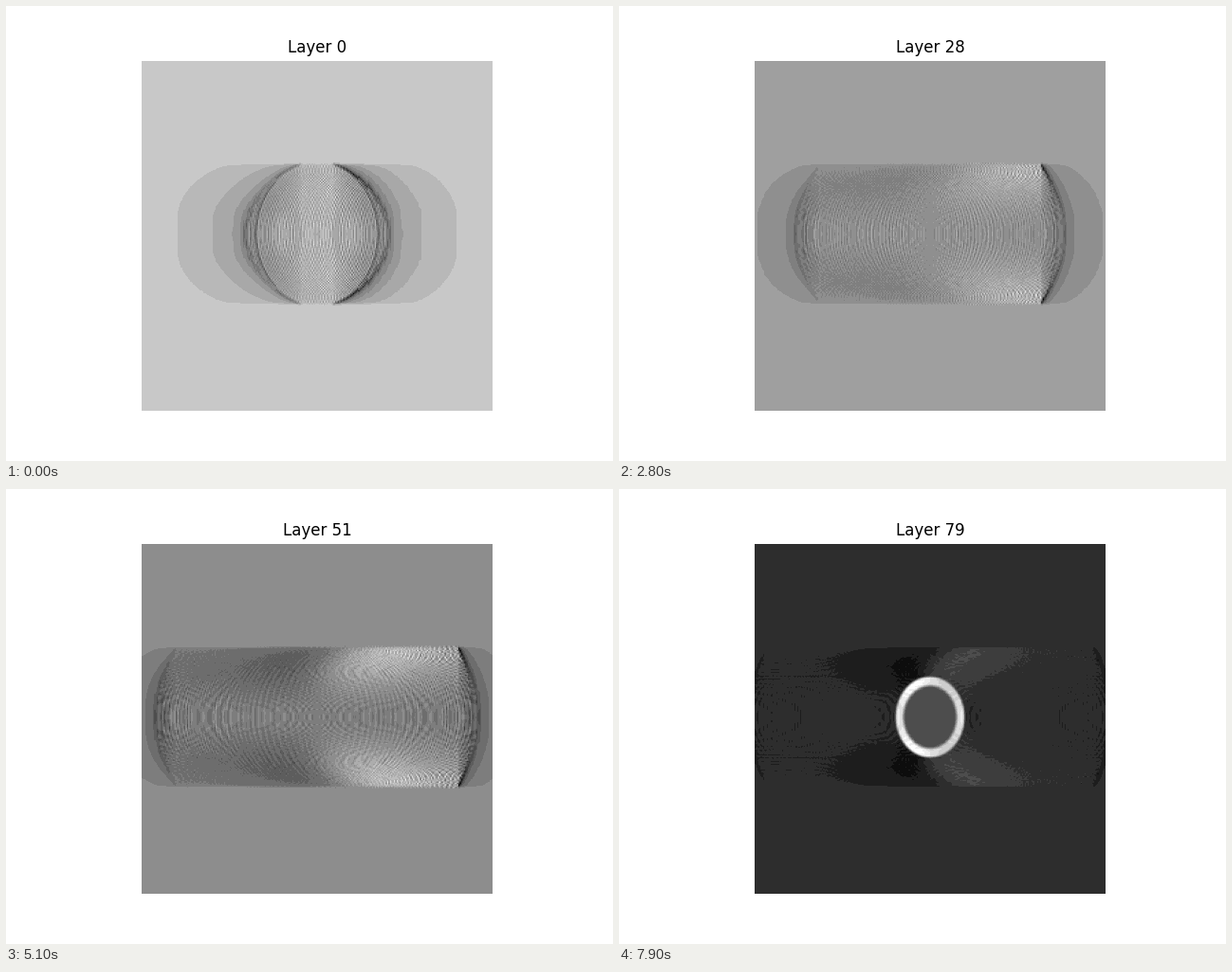
A matplotlib script for the animation above (8 s loop, 640 px wide and 480 px high).

```python
import numpy as np
import matplotlib.pyplot as plt
from matplotlib.animation import FuncAnimation
from matplotlib.colors import ListedColormap

SIZE, LAYERS, ROWS, TOP = 256, 80, 104, 75
VIEWS, HALF, RADIUS = 180, 128, 64
SKEW = 1.4   # how unevenly the views weigh towards the caps
STEP = 16    # grey levels per visible band

# Head phantom: density, semi-axes, x and y of the centre, tilt in degrees
ELLIPSOIDS = [
    (1.0, .69, .92, .81, 0, 0, 0),
    (-.8, .6624, .874, .78, 0, -.0184, 0),
    (-.2, .11, .31, .22, .22, 0, -18),
    (-.2, .16, .41, .28, -.22, 0, 18),
]


def project(theta, s, z):
    """Parallel line integrals through the phantom, shape (s, z)."""
    total = np.zeros((s.size, z.size))
    for rho, a, b, c, cx, cy, tilt in ELLIPSOIDS:
        phi = theta - np.radians(tilt)
        r2 = (a * np.cos(phi)) ** 2 + (b * np.sin(phi)) ** 2
        u = s / RADIUS - cx * np.cos(theta) - cy * np.sin(theta)
        q2 = 1 - (z / RADIUS / c) ** 2
        chord = np.sqrt(np.clip(q2 * r2 - u[:, None] ** 2, 0, None))
        total += 2 * rho * a * b / r2 * chord * RADIUS
    return total


def reconstruct():
    """Filtered back projection; each view is smeared over a turned square."""
    s = np.arange(SIZE) - (SIZE - 1) / 2
    z = np.arange(ROWS) - (ROWS - 1) / 2
    ramp = np.abs(np.fft.rfftfreq(SIZE))[:, None]
    y, x = np.meshgrid(HALF - 0.5 - np.arange(LAYERS), s, indexing="ij")
    x, y = x.ravel(), y.ravel()
    volume = np.zeros((x.size, ROWS), np.float32)
    for theta in np.arange(VIEWS) * np.pi / VIEWS:
        view = np.fft.irfft(np.fft.rfft(project(theta, s, z), axis=0) * ramp,
                            SIZE, axis=0)
        weight = np.exp(-SKEW * np.sin(2 * theta) * (z / z[-1]) ** 2)
        view = (view * weight * np.pi / VIEWS).astype(np.float32)
        pos = x * np.cos(theta) + y * np.sin(theta) + (SIZE - 1) / 2
        depth = y * np.cos(theta) - x * np.sin(theta)
        hit = np.flatnonzero((np.abs(depth) < HALF) & (pos >= 0)
                             & (pos < SIZE - 1))
        i = pos[hit].astype(int)
        f = (pos[hit] - i).astype(np.float32)[:, None]
        slope = np.diff(view, axis=0)
        volume[hit] += view[i] + slope[i] * f
    return volume.reshape(LAYERS, SIZE, ROWS).transpose(0, 2, 1)


def background(k):
    """Grey of empty space; it falls once the bright skull comes in."""
    return np.interp(k, [0, 16, 40, 51, 59, 68, 70, 79],
                     [200, 155, 164, 141, 152, 148, 50, 45])


def banded_grey(base):
    v = base + STEP * np.round((np.arange(256) - base) / STEP)
    v = np.clip(v, 0, 255) / 255
    return ListedColormap(np.column_stack([v, v, v]))


volume = reconstruct()
fig, ax = plt.subplots(figsize=(6.4, 4.8), dpi=100)
ax.axis("off")
image = ax.imshow(np.zeros((SIZE, SIZE)), cmap="gray", vmin=0, vmax=255)
title = ax.set_title("Layer 0")


def update(k):
    base = background(k)
    layer = volume[k]
    grey = np.full((SIZE, SIZE), base)
    grey[TOP:TOP + ROWS] += 255 * layer / np.ptp(layer)
    image.set_data(np.clip(grey, 0, 255))
    image.set_cmap(banded_grey(base))
    title.set_text(f"Layer {k}")
    return image, title


anim = FuncAnimation(fig, update, frames=LAYERS, interval=100,
                     repeat=True, repeat_delay=0, blit=False)
plt.show()
```
